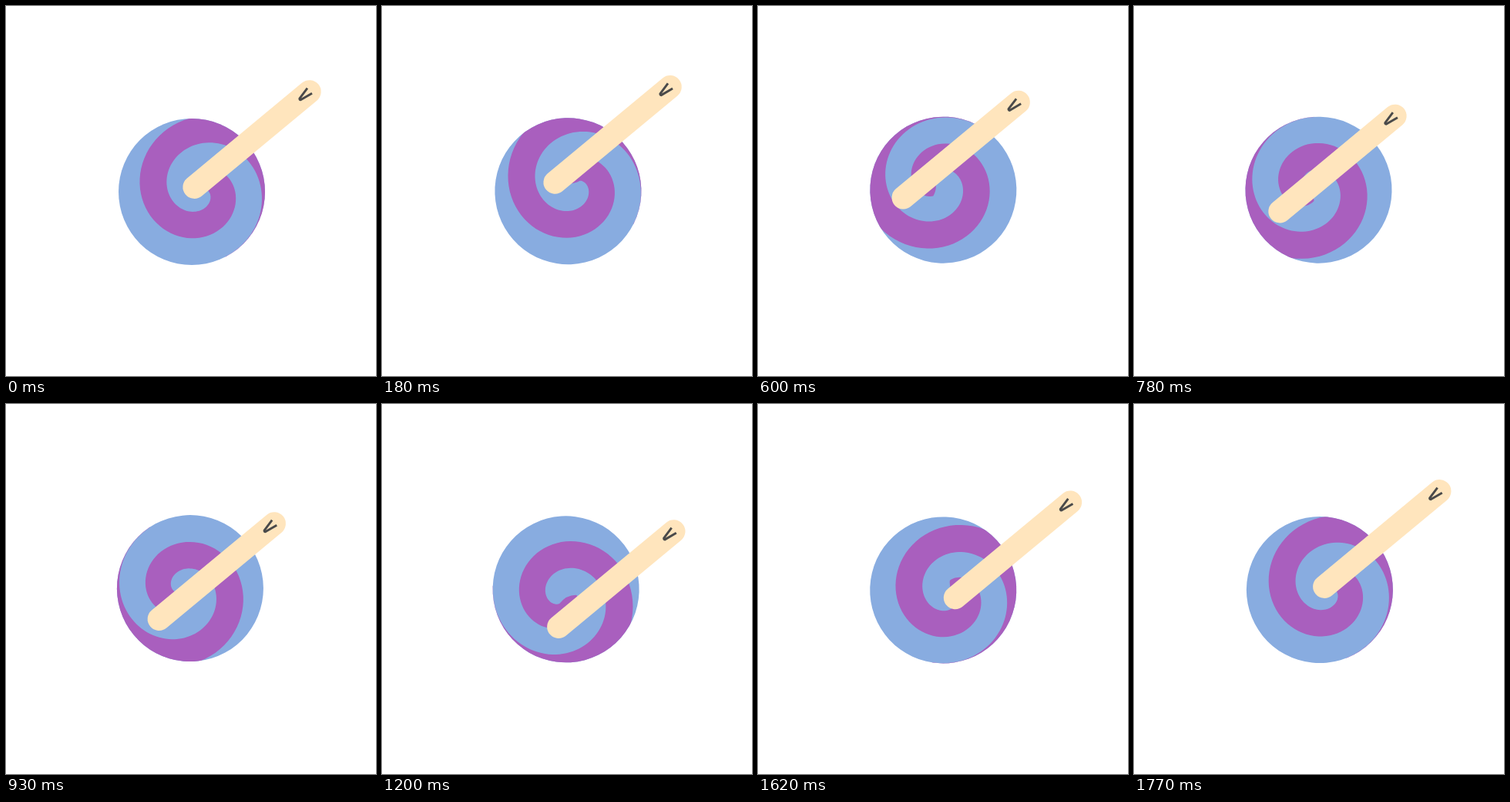
These frames come from a looping animation (480 by 480 pixels, 1.8 s). An HTML page:

```html
<!DOCTYPE html>
<html lang="en">
<head>
<meta charset="utf-8">
<title>Swirl and stick</title>
<style>
  html, body { margin: 0; width: 100%; height: 100%; overflow: hidden; background: #fff; }
  svg { display: block; width: 100vw; height: 100vh; }
</style>
</head>
<body>
<svg viewBox="0 0 480 480">
  <clipPath id="rim"><circle cx="241" cy="241" r="95"/></clipPath>
  <g id="disc">
    <circle cx="241" cy="241" r="95" fill="#88ace0"/>
    <path id="swirl" fill="#a95fbe" clip-path="url(#rim)"/>
  </g>
  <g id="stick" fill="none">
    <path d="M0 0L149.3 -123.8" stroke="#ffe5bd" stroke-width="30" stroke-linecap="round"/>
    <path d="M146.5 -128.3L136.2 -114.6L137.4 -112.9L152.6 -121.8" stroke="#4a4a4a" stroke-width="2.9" stroke-linejoin="bevel"/>
  </g>
</svg>
<script>
const LOOP = 1800;
const TAU = Math.PI * 2;
const { sin, cos } = Math;
const disc = document.getElementById('disc');
const stick = document.getElementById('stick');

// A point on an Archimedean spiral, turned by an offset; angles in degrees.
function spiralPoint(angle, offset) {
  const radius = 78.2 + 0.194 * angle;
  const a = (angle + offset) * TAU / 360;
  return `${(253 + radius * cos(a)).toFixed(2)} ${(239 + radius * sin(a)).toFixed(2)}`;
}

function spiral(from, to, offset) {
  const steps = 120;
  return Array.from({ length: steps + 1 },
    (_, i) => spiralPoint(from + (to - from) * i / steps, offset));
}

// Two edges half a turn apart, joined by a rounded hook; the rim clips the rest.
function swirlPath() {
  const inward = spiral(70, -360, 0);
  const [hookEnd, ...outward] = spiral(-310, 253, -183);
  return `M${inward.join('L')}Q247 237 ${hookEnd}L${outward.join('L')}Z`;
}

// The stick tip stirs along a slightly uneven ellipse.
function tipAt(turn) {
  const phase = -0.777 - turn - 0.105 * cos(turn);
  const lean = 0.9 * sin(turn);
  return [
    222 + 34 * cos(phase) - lean + 0.8 * cos(2 * turn),
    258.6 + 30 * sin(phase) - lean - 0.5 * cos(2 * turn) + 0.8 * sin(3 * turn)
  ];
}

function draw(time) {
  const progress = (time % LOOP) / LOOP;
  disc.setAttribute('transform', `rotate(${-360 * progress} 240 240)`);
  stick.setAttribute('transform', `translate(${tipAt(TAU * progress)})`);
}

let start;
function frame(now) {
  start ??= now;
  draw(now - start);
  requestAnimationFrame(frame);
}
document.getElementById('swirl').setAttribute('d', swirlPath());
draw(0);
requestAnimationFrame(frame);
</script>
</body>
</html>
```
